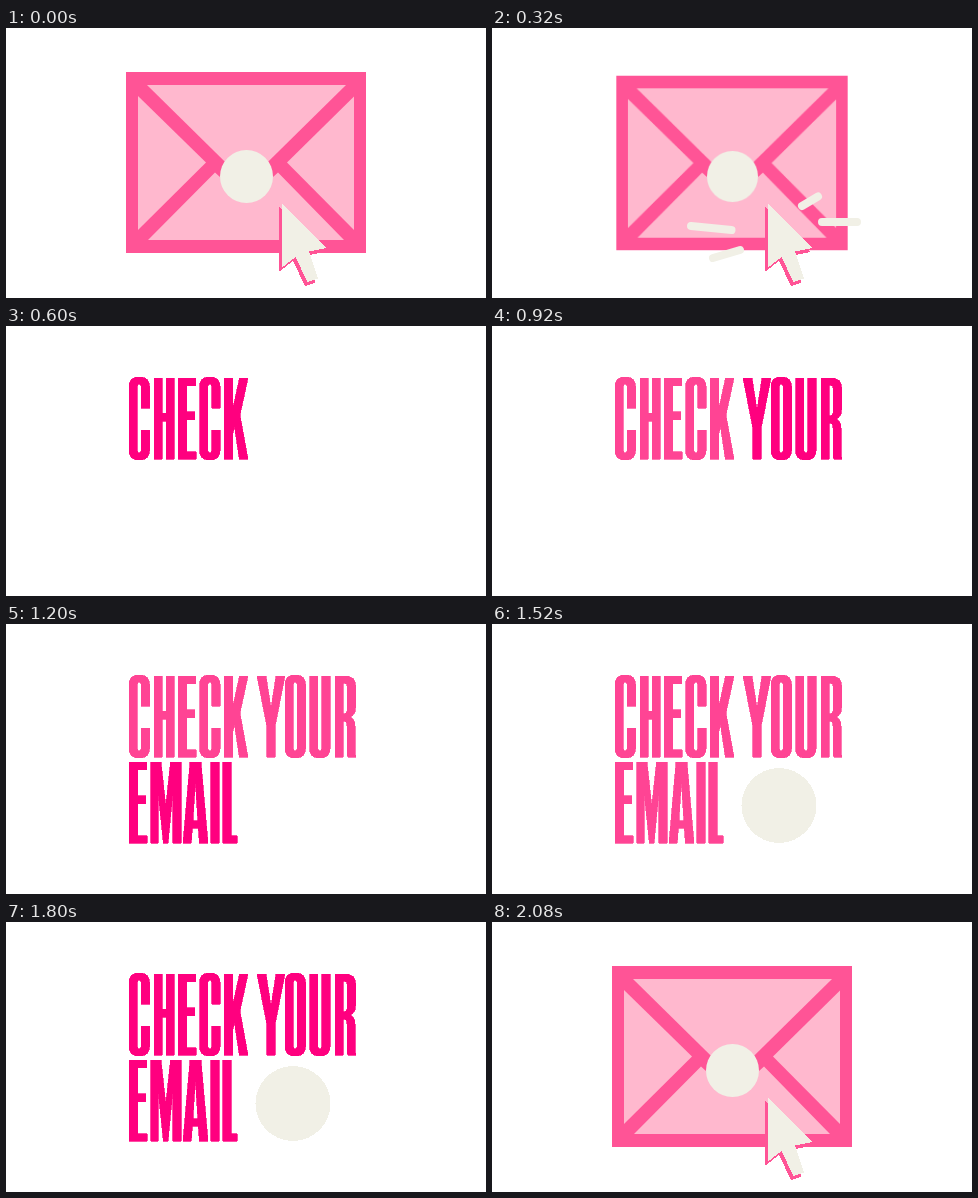
An HTML page for the animation above (2120 ms loop, 480 by 270 pixels).

```html
<!DOCTYPE html>
<html lang="en">
<head>
<meta charset="utf-8">
<title>Check your email</title>
<style>
  html, body { margin: 0; width: 100%; height: 100%; overflow: hidden; background: #fff; }
  svg { display: block; width: 100vw; height: 100vh; }
  .edge { fill: #ff5496; }
  .paper { fill: #ffb8ce; }
  .cream { fill: #f1f0e6; }
  .crisp { shape-rendering: crispEdges; }
  #envelope { transform-origin: 240px 148px; }
  #sparks { stroke: #f1f0e6; stroke-width: 8; stroke-linecap: round; }
  #words { fill-rule: evenodd; stroke-width: 0.7; }
  #words g { fill: currentColor; stroke: currentColor; }
</style>
</head>
<body>
<svg viewBox="0 0 480 270" role="img" aria-label="CHECK YOUR EMAIL">
  <defs>
    <path id="arrow" d="M275.500 175L321 220L303 223.500L312 250.500L301.500 254L289.500 229L276 239.500Z"/>
  </defs>
  <g id="mail">
    <g id="envelope">
      <path class="edge" d="M120 44H360V225H120Z"/>
      <path class="paper" d="M141 57H340L240.500 155Z"/>
      <path class="paper" d="M132 68L200 134.500L132 202Z"/>
      <path class="paper" d="M348 68.500L281 134.500L348 202Z"/>
      <path class="paper" d="M142 212L209 144.500L240.500 173L272 144.500L338 212Z"/>
      <circle class="cream" cx="240.500" cy="148.500" r="26.500"/>
    </g>
    <use href="#arrow" class="edge crisp" x="-2.500" y="4"/>
    <path id="sparks" d="M199 198L239.500 202M221 230L248 222M310 178L326 168.500M330 194H365"/>
    <use href="#arrow" class="cream crisp"/>
  </g>
  <g id="words" class="crisp"></g>
  <circle id="seal" class="cream crisp" cx="287" cy="181.500" r="37.500"/>
</svg>
<script>
const LOOP = 2120;
const STRONG = '#ff007f', SOFT = '#ff4494';

// Condensed capitals, 81 units tall
const glyphs = {
  C: 'M20.5 30H12.3V10Q12.3 6 10.25 6T8.2 10V71Q8.2 75 10.25 75T12.3 71V52H20.5V73Q20.5 82 10.25 82T0 73V8Q0 -1 10.25 -1T20.5 8Z',
  H: 'M0 0H8.3V35H12V0H20.3V81H12V43H8.3V81H0Z',
  E: 'M0 0H17.5V7.5H8.5V33.5H16.8V41.5H8.5V73.5H18V81H0Z',
  K: 'M0 0H8.5V32L15.5 0H24L16 37L24 81H15.3L10.5 49L8.5 57V81H0Z',
  Y: 'M0 0H9L14 32L19 0H28L18.2 50V81H9.8V50Z',
  O: 'M0 8Q0 -1 10.25 -1T20.5 8V73Q20.5 82 10.25 82T0 73ZM8.2 10V71Q8.2 75 10.25 75T12.3 71V10Q12.3 6 10.25 6T8.2 10Z',
  U: 'M0 0H8.2V71Q8.2 75 10.25 75T12.3 71V0H20.5V73Q20.5 82 10.25 82T0 73Z',
  R: 'M0 0H10Q20.5 0 20.5 9V32Q20.5 39 15 41Q20 43 20 50V74Q20 79 21 81H12.8Q12 79 12 75V50Q12 45 8.3 45V81H0ZM8.3 7V38Q12.3 38 12.3 33V11Q12.3 7 8.3 7Z',
  M: 'M0 0H10.5L15.3 44L20 0H30.5V81H22.2V32L17.6 81H12.8L7.8 32V81H0Z',
  A: 'M7 0H18L25 81H16.4L15.3 66H9.4L8.3 81H0ZM12.4 20L10 58.500H14.8Z',
  I: 'M0 0H8.5V81H0Z',
  L: 'M0 0H8.5V73.5H14.5V81H0Z'
};

const words = [
  { text: 'CHECK', y: 52, xs: [123, 148, 172, 193.5, 218], at: 600, soft: 920 },
  { text: 'YOUR', y: 52, xs: [251, 279, 303.5, 329], at: 920, soft: 1200 },
  { text: 'EMAIL', y: 138, xs: [123, 144.5, 177, 204.5, 216.5], at: 1200, soft: 1480 }
];

const find = id => document.getElementById(id);

function make(tag, attrs, parent) {
  const el = document.createElementNS('http://www.w3.org/2000/svg', tag);
  for (const key in attrs) el.setAttribute(key, attrs[key]);
  return parent.appendChild(el);
}

// Holds each value until the next step: [time, value]
function hold(el, prop, steps) {
  const frames = [...steps, [LOOP, steps.at(-1)[1]]].map(([t, value]) =>
    ({ offset: t / LOOP, [prop]: value, easing: 'steps(1, end)' }));
  el.animate(frames, { duration: LOOP, iterations: Infinity });
}

for (const { text, y, xs, at, soft } of words) {
  const group = make('g', { 'aria-label': text }, find('words'));
  [...text].forEach((ch, i) =>
    make('path', { d: glyphs[ch], transform: `translate(${xs[i]} ${y})` }, group));
  hold(group, 'opacity', [[0, 0], [at, 1], [2080, 0]]);
  hold(group, 'color', [[0, STRONG], [soft, SOFT], [1800, STRONG]]);
}

hold(find('mail'), 'opacity', [[0, 1], [600, 0], [2080, 1]]);
hold(find('envelope'), 'transform', [[0, 'scale(1)'], [320, 'scale(0.964)'], [600, 'scale(1)']]);
hold(find('sparks'), 'opacity', [[0, 0], [320, 1], [600, 0]]);
hold(find('seal'), 'opacity', [[0, 0], [1480, 1], [2080, 0]]);
</script>
</body>
</html>
```
